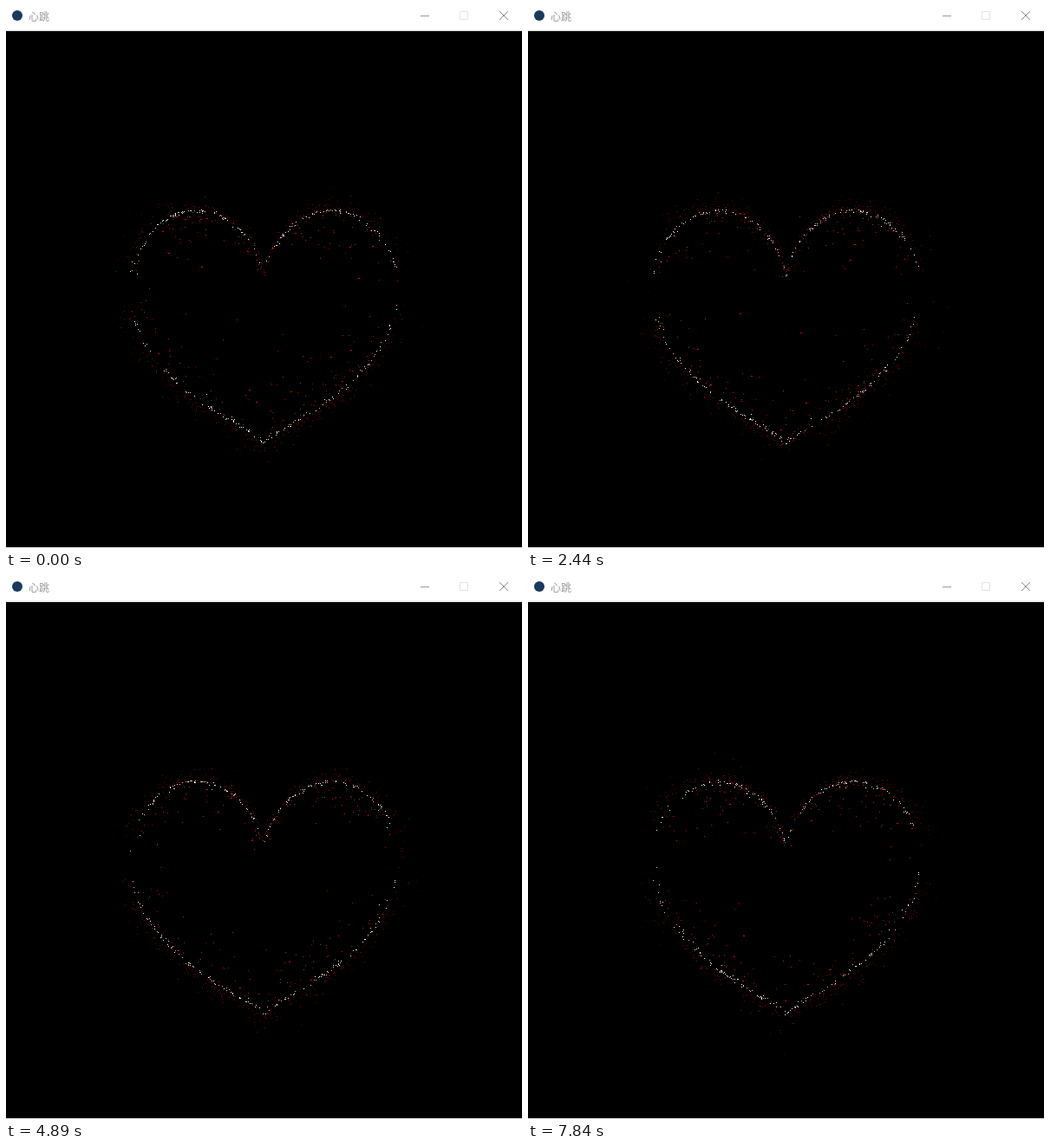
An HTML page with a canvas that plays this animation: 595x627 px, repeating every 7900 ms.

```html
<!DOCTYPE html>
<html lang="zh">
<head>
<meta charset="utf-8">
<title>心跳</title>
<style>
  html, body { margin: 0; width: 100%; height: 100%; overflow: hidden; background: #fff; }
  .window { position: relative; width: 595px; height: 627px; overflow: hidden; background: #fff; }
  .bar { position: absolute; left: 0; top: 0; width: 595px; height: 29px; }
  .title { position: absolute; left: 26px; top: 3px; font: 300 12px/17px "Noto Sans CJK SC", "Noto Sans CJK", sans-serif;
    color: #999; white-space: nowrap; }
  canvas { position: absolute; left: 0; top: 29px; background: #000; }
</style>
</head>
<body>
<div class="window">
  <svg class="bar" viewBox="0 0 595 29" fill="none">
    <path d="M0 27.5H595" stroke="#f4f4f4"/>
    <path d="M0 28.5H595" stroke="#e4e4e4"/>
    <circle cx="13" cy="11" r="6" fill="#183a5e"/>
    <path d="M478 11.5h10" stroke="#999"/>
    <path d="M523.5 6.5h9v9h-9z" stroke="#e2e2e2"/>
    <path d="M569 6l10 10M579 6l-10 10" stroke="#8c8c8c"/>
  </svg>
  <div class="title">心跳</div>
  <canvas width="595" height="596"></canvas>
</div>
<script>
const LOOP = 7900, STEPS = 131;
const CX = 297.5, CY = 340, TOP = 29;
const ctx = document.querySelector('canvas').getContext('2d');
const { asin, cbrt, sin, cos, log, floor, PI } = Math;

let seed = 1;
function rand() {
  seed = (seed + 0x6D2B79F5) | 0;
  let r = Math.imul(seed ^ (seed >>> 15), 1 | seed);
  r = (r + Math.imul(r ^ (r >>> 7), 61 | r)) ^ r;
  return ((r ^ (r >>> 14)) >>> 0) / 4294967296;
}
const pick = list => list[floor(rand() * list.length)];
const spread = size => -log(1 - rand()) * size;
const jitter = size => (rand() - .5) * size;

// Even in x, so the steep sides stay sparse.
function angle() {
  const t = asin(cbrt(rand() * 2 - 1));
  return rand() < .5 ? t : PI - t;
}

function heart(t) {
  return [
    156 * sin(t) ** 3,
    362 - CY - 130 * cos(t) + 42 * cos(2 * t) + 33 * cos(3 * t) + 7 * cos(4 * t)
  ];
}

function dot(scaleX, scaleY, noise, color, width = 1) {
  const [x, y] = heart(angle());
  ctx.fillStyle = color;
  ctx.fillRect(floor(CX + x * scaleX + jitter(noise)), floor(CY + y * scaleY + jitter(noise)) - TOP, width, 1);
}

const EDGE = ['#fff', '#fff', '#ffe0d4', '#ffb8a8', '#e8f4e8', '#ff9c8c'];
const INNER = ['#f00', '#e00000', '#c00', '#a00', '#900', '#555', '#3c5450'];
const NEAR = ['#900', '#700', '#600', '#500'];
const FAR = ['#700', '#500', '#400', '#2c2c2c'];

function draw(step) {
  seed = step * 7919 + 17;
  ctx.clearRect(0, 0, 595, 596);
  for (let i = 0; i < 400; i++) {
    const dx = spread(.05), dy = spread(.05);
    dot(1 + dx, 1 + dy, 4, pick(dx + dy < .12 ? NEAR : FAR));
  }
  for (let i = 0; i < 220; i++) {
    const color = pick(INNER);
    dot(1 - spread(.11), 1 - spread(.17), 3, color, color === '#f00' && rand() < .4 ? 2 : 1);
  }
  for (let i = 0; i < 290; i++) dot(1 - spread(.012), 1 - spread(.014), 2, pick(EDGE));
}

let shown = -1;
function tick() {
  const step = floor((performance.now() % LOOP) / LOOP * STEPS);
  if (step !== shown) draw(shown = step);
  requestAnimationFrame(tick);
}
tick();
</script>
</body>
</html>
```
